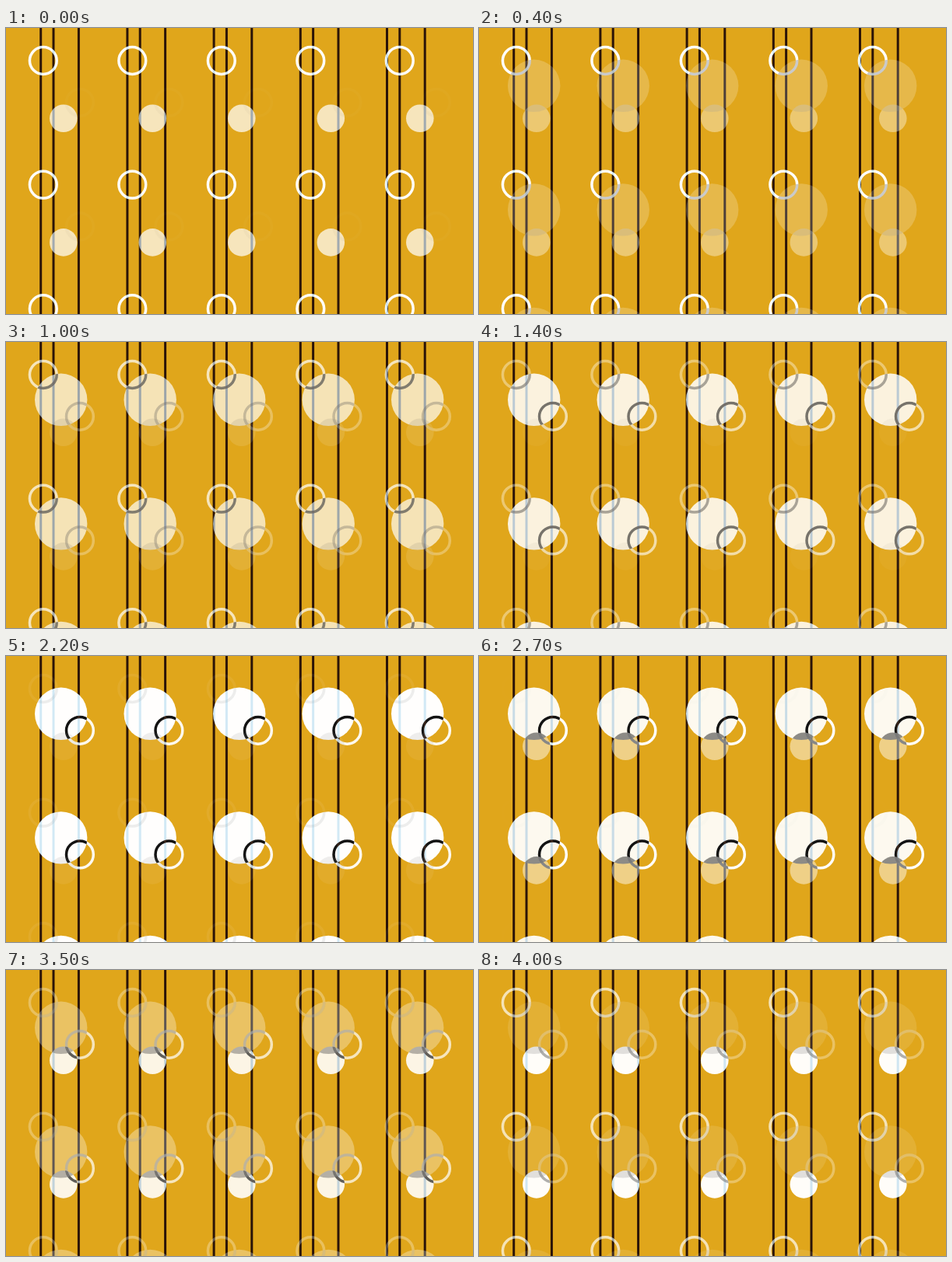
Write an HTML page with a canvas that moves like this. It is 600x368 px and loops after 4.1 s.

```html
<!DOCTYPE html>
<html lang="en">
<head>
<meta charset="utf-8">
<title>Dots and stripes</title>
<style>
  html, body { margin: 0; width: 100%; height: 100%; overflow: hidden; background: #e0a61b; }
  canvas { display: block; }
</style>
</head>
<body>
<canvas id="stage" width="600" height="368"></canvas>
<script>
const ctx = document.getElementById('stage').getContext('2d');
const LOOP = 4100, STEP = 100, HALF = 2500;
const COLS = 5, ROWS = 3, DX = 114.5, DY = 159.6;
const STRIPES = [44.7, 61, 93.4], STRIPE_DX = 111.2, STRIPE_W = 3;

// start: when the fade-in begins; each fade takes HALF
const SHAPES = [
  { x: 47.8, y: 42, r: 17.4, ring: true, start: 3000 },
  { x: 70.7, y: 74.3, r: 33.7, start: 0 },
  { x: 94.9, y: 95.8, r: 17.4, ring: true, start: 500 },
  { x: 73.8, y: 116.3, r: 17.8, start: 2000 }
];

const bezier = (a, b, s) => 3 * a * s * (1 - s) ** 2 + 3 * b * s * s * (1 - s) + s ** 3;

// CSS "ease": cubic-bezier(.25, .1, .25, 1)
function ease(x) {
  let lo = 0, hi = 1;
  for (let i = 0; i < 24; i++) {
    const mid = (lo + hi) / 2;
    if (bezier(.25, .25, mid) < x) lo = mid; else hi = mid;
  }
  return bezier(.1, 1, lo);
}

function opacity(time, start) {
  const t = (time - start + 2 * HALF) % (2 * HALF);
  return t < HALF ? ease(t / HALF) : 1 - ease(t / HALF - 1);
}

function drawStripes() {
  ctx.globalAlpha = 1;
  ctx.fillStyle = '#2b1408';
  for (let i = 0; i < COLS; i++) {
    for (const x of STRIPES) {
      ctx.fillRect(x + i * STRIPE_DX - STRIPE_W / 2, 0, STRIPE_W, 368);
    }
  }
}

function drawShape({ x, y, r, ring, start }, time) {
  ctx.globalAlpha = opacity(time, start);
  for (let row = 0; row < ROWS; row++) {
    for (let col = 0; col < COLS; col++) {
      ctx.beginPath();
      ctx.arc(x + col * DX, y + row * DY, r, 0, 2 * Math.PI);
      if (ring) ctx.stroke(); else ctx.fill();
    }
  }
}

function draw(time) {
  ctx.globalCompositeOperation = 'source-over';
  ctx.clearRect(0, 0, 600, 368);
  drawStripes();
  ctx.globalCompositeOperation = 'difference';
  ctx.fillStyle = ctx.strokeStyle = '#fff';
  ctx.lineWidth = 3.5;
  for (const shape of SHAPES) drawShape(shape, time);
}

const begin = performance.now();
function tick() {
  const time = (performance.now() - begin) % LOOP;
  draw(Math.floor(time / STEP) * STEP);
  requestAnimationFrame(tick);
}
tick();
</script>
</body>
</html>
```
